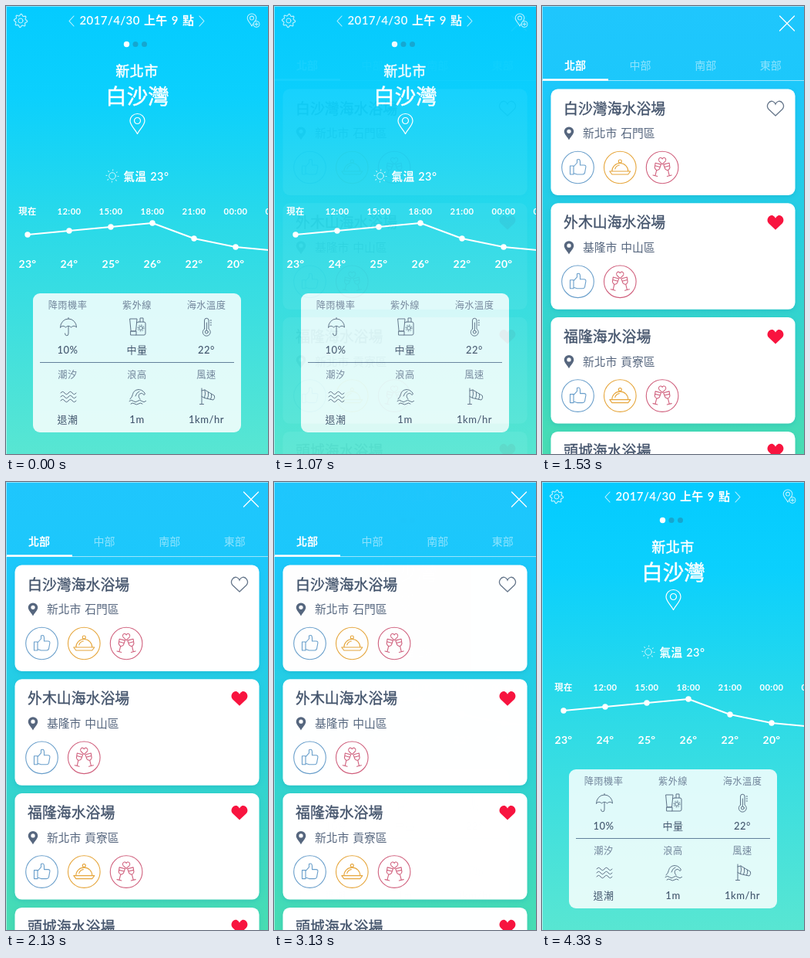
Write an HTML page that moves like this. It is 340x580 px and loops after 4390 ms.

```html
<!DOCTYPE html>
<html lang="zh-Hant">
<head>
<meta charset="utf-8">
<title>海灘天氣</title>
<style>
html, body { margin: 0; width: 100%; height: 100%; overflow: hidden; }
svg { display: block; width: 340px; height: 580px; }
text { font-family: Lato, "Noto Sans CJK TC", "Noto Sans CJK JP", sans-serif; }
.mid { text-anchor: middle; }
.line { fill: none; stroke: #fff; stroke-linecap: round; stroke-linejoin: round; }
.soft { opacity: .78; }
.ink { fill: none; stroke: #5d7186; stroke-width: 1; stroke-linecap: round; stroke-linejoin: round; }
.label { font-size: 12.2px; letter-spacing: .5px; fill: #71849a; }
.value { font-size: 13px; letter-spacing: .5px; font-weight: 500; fill: #43566e; }
.place { fill: #fff; stroke: #fff; stroke-width: .5; }
.title { font-size: 18.9px; fill: #43536b; stroke: #43536b; stroke-width: .35; }
.badge { fill: none; stroke-width: 1.1; stroke-linecap: round; stroke-linejoin: round; }
.list { animation: swap 4390ms infinite ease-in-out; }
@keyframes swap {
  0%, 23.2% { opacity: 0; }
  30.6%, 71.3% { opacity: 1; }
  78.7%, 100% { opacity: 0; }
}
</style>
</head>
<body>
<svg viewBox="0 0 340 580">
  <defs>
    <linearGradient id="sky" x2="0" y2="1">
      <stop stop-color="#04cbff"/>
      <stop offset=".2" stop-color="#0bd0fd"/>
      <stop offset=".5" stop-color="#2bdae8"/>
      <stop offset="1" stop-color="#58e6d2"/>
    </linearGradient>
    <linearGradient id="sea" x2="0" y2="1">
      <stop stop-color="#1fc6fd"/>
      <stop offset=".18" stop-color="#1cc8fb"/>
      <stop offset=".5" stop-color="#26cfe0"/>
      <stop offset="1" stop-color="#48ddb2"/>
    </linearGradient>
    <filter id="shade" x="-5%" y="-8%" width="110%" height="120%">
      <feDropShadow dx="0" dy="2" stdDeviation="3" flood-color="#087ea0" flood-opacity=".22"/>
    </filter>
    <path id="heart" d="M0 9.5L-9 1C-13-4-8-10.5-3.5-9Q-1-8 0-5.5Q1-8 3.5-9C8-10.5 13-4 9 1Z"/>
    <path id="pin" fill-rule="evenodd" d="M0 13C-3 7-9.5 2-9.5-4A9.5 9 0 0 1 9.5-4C9.5 2 3 7 0 13ZM4-4A4 4 0 1 0-4-4A4 4 0 1 0 4-4Z"/>
    <path id="glass" d="M-3.8-7H3.8L3.2-1Q0 4-3.2-1ZM-3.5-3.5H3.5M0 2V9M-3 9H3"/>
    <path id="like" d="M-10-2H-5.5V9H-10ZM-5.5-1L-1-6V-10Q3-12 3-7V-3H8Q11-3 10.3 0L9 7Q8.5 9 6 9H-1L-5.5 7.5"/>
    <g id="meal"><path d="M-10.5 5A10.5 10.5 0 0 1 10.5 5M-13.5 5H13.5L10.5 9H-10.5ZM-6.5 2A7 7 0 0 1-1-3"/><circle cy="-8" r="2"/></g>
    <g id="party">
      <use href="#glass" transform="translate(-7 2) rotate(14)"/>
      <use href="#glass" transform="translate(7 2) rotate(-14)"/>
      <use href="#heart" transform="translate(0 -8.5) scale(.45)" stroke-width="2.3"/>
    </g>
  </defs>

  <g id="weather">
    <rect width="340" height="580" fill="url(#sky)"/>
    <g class="soft">
      <path id="gear" class="line" stroke-width="1.1"/>
      <circle class="line" cx="19" cy="19" r="3"/>
      <path class="line" stroke-width="1.1" d="M88 13L82 19.5L88 26M251 13L257 19.5L251 26"/>
      <use href="#pin" class="line" stroke-width="1.7" transform="translate(319 18) scale(.61)"/>
      <circle cx="325" cy="23.5" r="4" fill="#0bcdfd" stroke="#fff"/>
      <path class="line" d="M323 23.5H327M325 21.5V25.5"/>
      <circle class="line" cx="138" cy="220" r="4.3"/>
      <circle class="line" cx="138" cy="220" r="7.5" stroke-width="2" stroke-dasharray="1 4.89" style="stroke-linecap:butt"/>
    </g>
    <text class="mid" x="170" y="23.5" font-size="15" font-weight="600" fill="#fff" letter-spacing=".4" word-spacing="1">2017/4/30 上午 9 點</text>
    <circle cx="156.5" cy="49.5" r="3.7" fill="#fff"/>
    <g fill="#16a6cf"><circle cx="168" cy="49.5" r="3.5"/><circle cx="179.5" cy="49.5" r="3.5"/></g>
    <g class="mid place">
      <text x="170" y="91" font-size="18" letter-spacing=".5">新北市</text>
      <text x="170.5" y="126.5" font-size="27.5">白沙灣</text>
    </g>
    <use href="#pin" class="line" stroke-width="1.2" x="170.5" y="152.5"/>
    <text x="152.500" y="226" font-size="14.5" font-weight="600" fill="#fff" letter-spacing=".4" word-spacing="1">氣溫 23°</text>
    <g id="hours" fill="#fff"></g>

    <rect x="35" y="372" width="270" height="180" rx="9" fill="#fff" fill-opacity=".84"/>
    <path d="M44 461.5H296" stroke="#62809a"/>
    <g id="facts" class="mid"></g>
    <!-- umbrella -->
    <path class="ink" d="M70.500 416A10.500 11 0 0 1 91.500 416Q88 412.500 84.500 416Q81 412.500 77.500 416Q74 412.500 70.500 416ZM81 405V403.500M81 414.500V424Q81 427 78.700 426.700Q76.500 426.500 76.500 424"/>
    <!-- sunscreen -->
    <path class="ink" d="M161 405H170L168.500 421H162.500ZM162 421H169V426H162ZM172 409H179Q181 409 181 411V424Q181 426 179 426H169M174 409V404H178V409M170 410Q171 409 172 409"/>
    <circle class="ink" cx="175" cy="417" r="2.4"/>
    <circle class="ink" cx="175" cy="417" r="4" stroke-dasharray=".8 2.34"/>
    <!-- thermometer -->
    <path class="ink" d="M257.500 418V407A2.700 2.700 0 0 1 263 407V418A5 5 0 1 1 257.500 418ZM260.300 410V420M265 407H266.500M265 410H266.500M265 413H266.500"/>
    <circle class="ink" cx="260.300" cy="422" r="2"/>
    <!-- tide -->
    <path class="ink" d="M71 501q2.500-3.500 5 0t5 0t5 0t5 0M71 506q2.500-3.500 5 0t5 0t5 0t5 0M71 511q2.500-3.500 5 0t5 0t5 0t5 0"/>
    <!-- wave -->
    <path class="ink" d="M161 509Q164 506 164.500 502.500C166 496 175 494 180 501Q181 503 179 503.500Q177 500 173.500 502Q170.500 505 174 509M168 505Q169 500.500 173 499M160 511.500q2.700-2.500 5.400 0t5.400 0t5.400 0t5.400 0M162 515q2.500-2 5 0t5 0t5 0"/>
    <!-- windsock -->
    <path class="ink" d="M254 495V515.500M251.500 515.500H256.500M254 498L258 497L270.500 504.500Q271.500 508 269 510L257.500 507.500L254 505.500M258 497Q259.500 502 257.500 507.500M262.500 500Q263.500 504 261.500 508.300M266.500 502.300Q267.500 506 265.500 509.200"/>
  </g>

  <g class="list">
    <rect width="340" height="580" fill="url(#sea)"/>
    <path class="line" stroke-width="1.3" d="M308.500 13L327.500 32M327.500 13L308.500 32"/>
    <g id="tabs" class="mid" font-size="14" fill="#fff"></g>
    <path d="M0 96.5H340" stroke="#fff" stroke-opacity=".55"/>
    <path d="M1 95.5H86" stroke="#fff" stroke-width="2.5"/>
    <g id="cards"></g>
  </g>
  <path d="M.5 580V.5H340" fill="none" stroke="#fff" stroke-opacity=".5"/>
</svg>
<script>
const put = (id, html) => document.getElementById(id).innerHTML = html;
const each = (rows, draw) => rows.map(draw).join('');

// eight-toothed cog
let cog = '';
for (let i = 0; i < 32; i++) {
  const r = i % 4 < 2 ? 8.6 : 6.5, a = (i + (i % 2 ? -.15 : .15)) * Math.PI / 16;
  cog += `${i ? 'L' : 'M'}${19 + r * Math.cos(a)} ${19 + r * Math.sin(a)}`;
}
document.getElementById('gear').setAttribute('d', cog + 'Z');

const hours = [['現在', 23, 296], ['12:00', 24, 291], ['15:00', 25, 286], ['18:00', 26, 281],
  ['21:00', 22, 301], ['00:00', 20, 312], ['03:00', 19, 317]];
const hx = i => 28 + 54 * i;
put('hours',
  `<polyline class="line" stroke-width="2" points="${each(hours, (h, i) => `${hx(i)},${h[2]} `)}"/>` +
  each(hours, ([time, deg, y], i) => `<circle cx="${hx(i)}" cy="${y}" r="3.7"/>
    <text class="mid" x="${hx(i)}" y="270" font-size="11.3" font-weight="700" letter-spacing=".4">${time}</text>
    <text class="mid" x="${hx(i)}" y="339" font-size="14" font-weight="700" letter-spacing=".3">${deg}<tspan dy="-1">°</tspan></text>`));

const facts = [['降雨機率', '10%'], ['紫外線', '中量'], ['海水溫度', '22°'],
  ['潮汐', '退潮'], ['浪高', '1m'], ['風速', '1km/hr']];
put('facts', each(facts, ([label, value], i) => {
  const x = 80 + 90 * (i % 3), y = i < 3 ? 392 : 482;
  return `<text class="label" x="${x}" y="${y}">${label}</text>
    <text class="value" x="${x}" y="${y + 58}">${value}</text>`;
}));

put('tabs', each(['北部', '中部', '南部', '東部'], (name, i) =>
  `<text x="${43 + 84.6 * i}" y="82" ${i ? 'opacity=".5"' : 'font-weight="700"'}>${name}</text>`));

const tint = { like: '#6a9fcb', meal: '#e6a63c', party: '#d0607d' };
const all = ['like', 'meal', 'party'];
const beaches = [['白沙灣海水浴場', '新北市 石門區', all], ['外木山海水浴場', '基隆市 中山區', ['like', 'party']],
  ['福隆海水浴場', '新北市 貢寮區', all], ['頭城海水浴場', '宜蘭縣 頭城鎮', all]];
put('cards', each(beaches, ([name, place, badges], i) => `<g transform="translate(0 ${107.5 + 147.8 * i})">
  <rect x="11.5" width="317" height="137.5" rx="9" fill="#fff" filter="url(#shade)"/>
  <text class="title" x="28" y="32">${name}</text>
  <use href="#pin" fill="#56667e" transform="translate(35 57.5) scale(.66)"/>
  <text x="53" y="62.5" font-size="14.8" fill="#56667e" word-spacing="1">${place}</text>
  <use href="#heart" x="303" y="25" ${i ? 'fill="#f8143f"' : 'fill="none" stroke="#68788c" stroke-width="1.3"'}/>
  ${each(badges, (b, k) => `<g class="badge" stroke="${tint[b]}" transform="translate(${46.5 + 54.8 * k} 101.5)">
    <circle r="20.8"/><use href="#${b}"/></g>`)}
</g>`));
</script>
</body>
</html>
```
